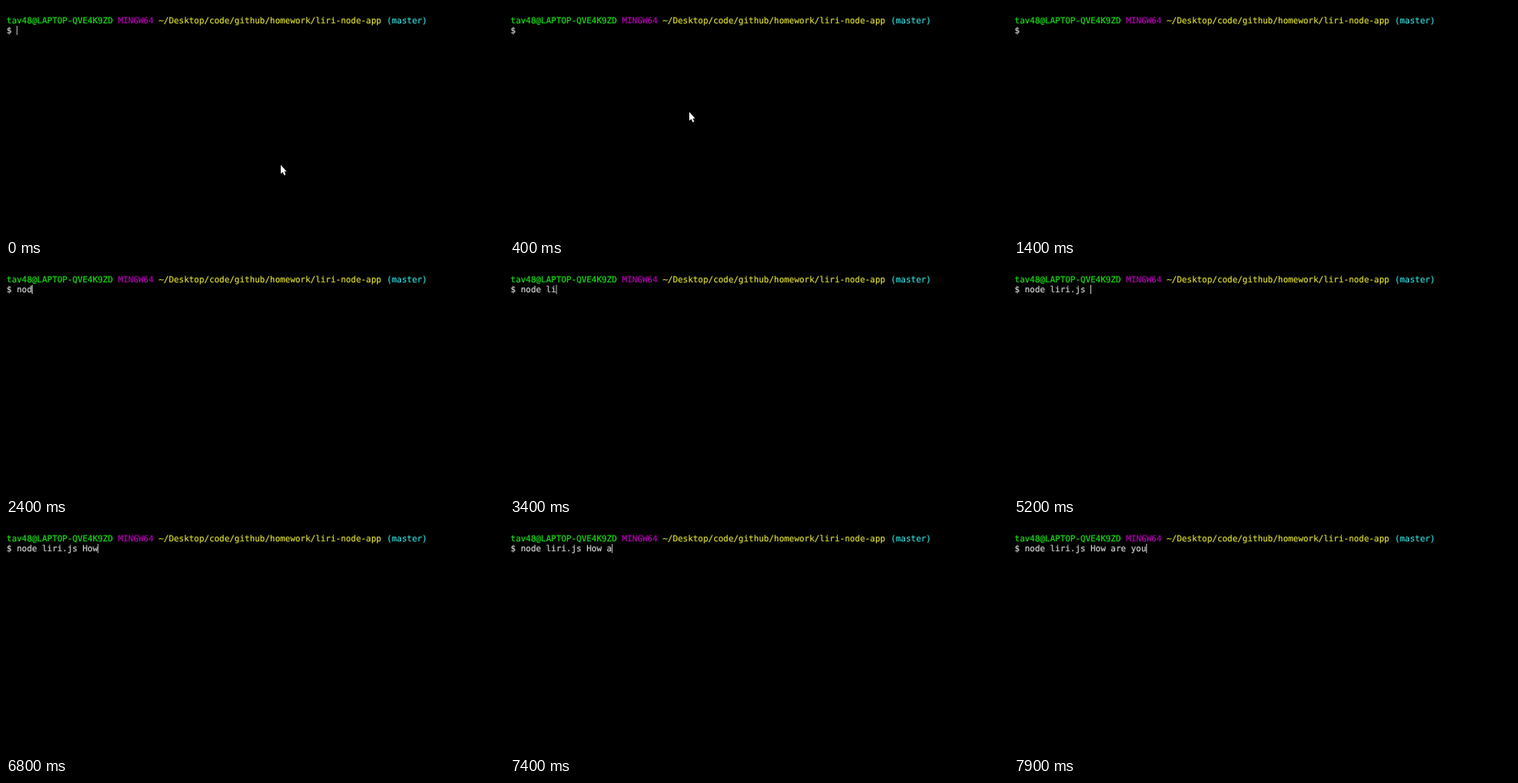
Animation of 600 by 279 pixels, one loop 8 s. Source, as an HTML page:

```html
<!DOCTYPE html>
<html lang="en">
<head>
<meta charset="utf-8">
<title>Terminal</title>
<style>
  html, body { margin: 0; width: 100%; height: 100%; overflow: hidden; background: #000; }
  svg { display: block; width: 100%; height: 100%; }
  text {
    font: 10.14px "DejaVu Sans Mono", "Liberation Mono", monospace;
    white-space: pre;
    text-rendering: geometricPrecision;
    stroke-width: 0.2px;
  }
</style>
</head>
<body>
<svg viewBox="0 0 600 279">
  <g id="prompt"></g>
  <text x="0.8" y="33.2" fill="#d0d0d0" stroke="#d0d0d0" id="line"></text>
  <rect id="caret" y="24" width="1" height="11" fill="#c0c0c0"/>
  <path id="mouse" d="M0 0V10.6L2.5 8.4L4.2 12.4L5.9 11.6L4.2 7.8H7Z" fill="#fff"/>
</svg>
<script>
const LOOP = 8000, CELL = 6.105, LEFT = 0.8;
const $ = id => document.getElementById(id);
const colX = col => LEFT + col * CELL;

// column, colour, text
const prompt = [
  [0, "#18e018", "tav48@LAPTOP-QVE4K9ZD"],
  [22, "#b400b4", "MINGW64"],
  [30, "#d8d830", "~/Desktop/code/github/homework/liri-node-app"],
  [75, "#30d4d4", "(master)"]
];
for (const [col, colour, str] of prompt) {
  const t = document.createElementNS("http://www.w3.org/2000/svg", "text");
  t.setAttribute("x", colX(col));
  t.setAttribute("y", 21.3);
  t.setAttribute("fill", colour);
  t.setAttribute("stroke", colour);
  t.textContent = str;
  $("prompt").append(t);
}

// time, typed text
const typed = [
  [0, ""], [2200, "n"], [2300, "no"], [2400, "nod"], [2500, "node"],
  [2600, "node "], [2700, "node l"], [2800, "node "],
  [3200, "node l"], [3400, "node li"], [3600, "node lir"], [3800, "node liri"],
  [4200, "node liri."], [4500, "node liri.j"], [4600, "node liri.js"],
  [5200, "node liri.js "], [6300, "node liri.js H"], [6400, "node liri.js Ho"],
  [6500, "node liri.js H"], [6700, "node liri.js Ho"], [6800, "node liri.js How"],
  [6900, "node liri.js How "], [7000, "node liri.js How a"], [7200, "node liri.js How "],
  [7400, "node liri.js How a"], [7500, "node liri.js How ar"],
  [7600, "node liri.js How are"], [7700, "node liri.js How are "],
  [7800, "node liri.js How are yo"], [7900, "node liri.js How are you"]
];

// time, caret shown
const blink = [
  [0, true], [300, false], [900, true], [1400, false], [2000, true],
  [5100, false], [5200, true], [5700, false], [6200, true]
];

// time, pointer tip (none = hidden)
const pointer = [
  [0, [331, 192]], [200, [298, 174]], [300, [250, 147]], [400, [216, 128]],
  [900, [196, 117]], [1000, [172, 104]], [1100, null]
];

const at = (steps, t) => steps.findLast(s => s[0] <= t)[1];

function draw(t) {
  const str = "$ " + at(typed, t);
  if ($("line").textContent !== str) $("line").textContent = str;
  $("caret").setAttribute("x", colX(str.length) - 0.3);
  $("caret").setAttribute("visibility", at(blink, t) ? "visible" : "hidden");
  const tip = at(pointer, t);
  $("mouse").setAttribute("visibility", tip ? "visible" : "hidden");
  if (tip) $("mouse").setAttribute("transform", `translate(${tip})`);
}

const start = performance.now();
function tick() {
  draw((performance.now() - start) % LOOP);
  requestAnimationFrame(tick);
}
tick();
</script>
</body>
</html>
```
